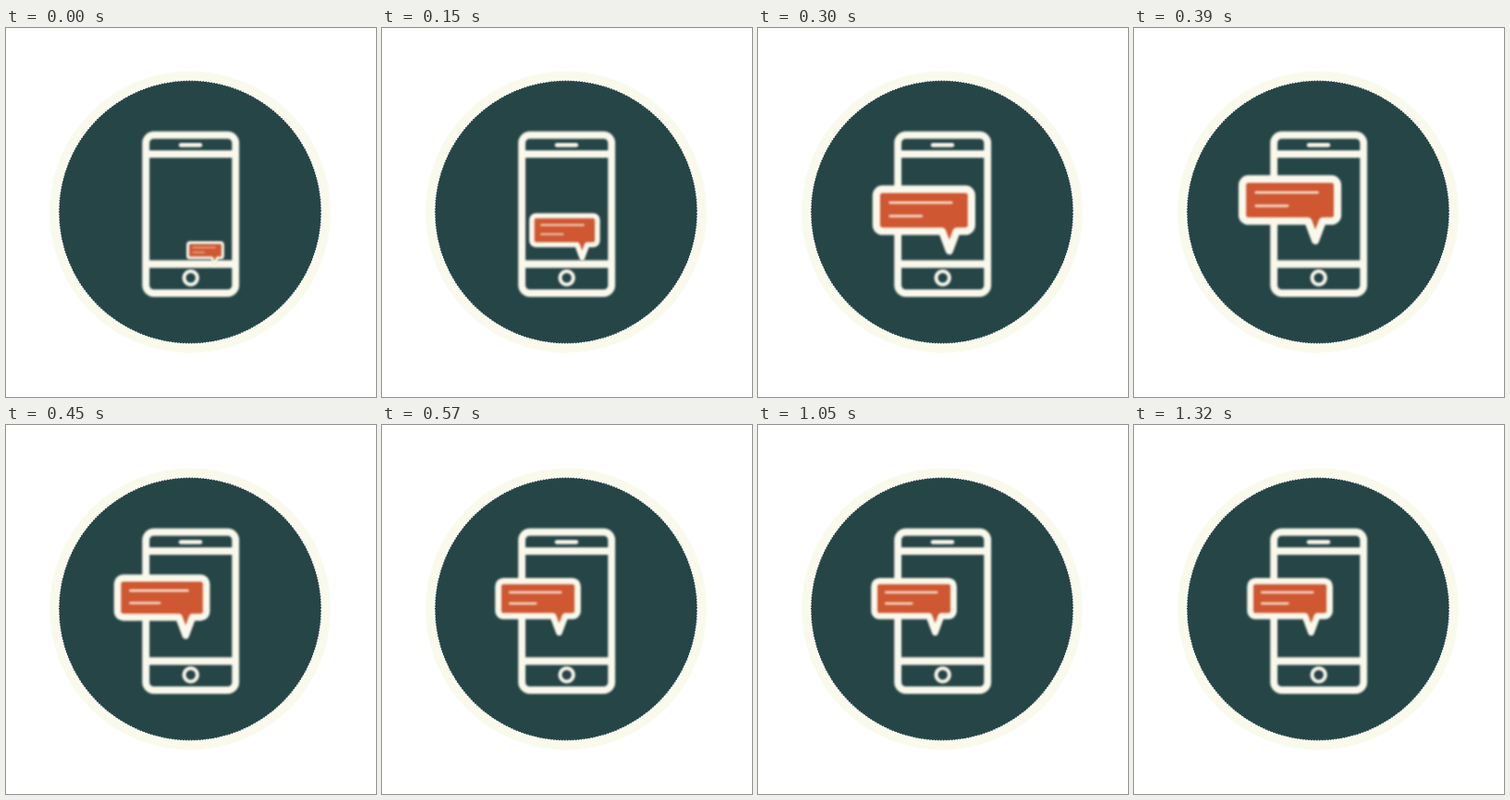
Animation of 400x398 px, one loop 1.35 s. Source, as an HTML page with a canvas:

```html
<!DOCTYPE html>
<html lang="en">
<head>
<meta charset="utf-8">
<title>Phone message</title>
<style>
  html, body { margin: 0; width: 100%; height: 100%; overflow: hidden; background: #fff; }
  canvas { display: block; }
</style>
</head>
<body>
<canvas id="stage" width="400" height="398"></canvas>
<script>
const ctx = document.getElementById('stage').getContext('2d');
const CREAM = '#faf8eb', RING = '#fafaec', TEAL = '#264547', ORANGE = '#cf5732', PALE = '#f5dcc8';
const LOOP = 1350, STEP = 30;
const START = { x: 215.5, y: 243.6 }, REST = { x: 168.7, y: 196 };
const SMALL = 0.44, LARGE = 1.2;

const clamp01 = v => Math.min(1, Math.max(0, v));
const lerp = (a, b, t) => a + (b - a) * t;
const progress = (t, from, to) => clamp01((t - from) / (to - from));

function circle(x, y, radius) {
  ctx.beginPath();
  ctx.arc(x, y, radius, 0, Math.PI * 2);
}

function line(x1, x2, y, width, color, cap = 'round') {
  ctx.strokeStyle = color;
  ctx.lineWidth = width;
  ctx.lineCap = cap;
  ctx.beginPath();
  ctx.moveTo(x1, y);
  ctx.lineTo(x2, y);
  ctx.stroke();
}

function drawBadge() {
  ctx.fillStyle = RING;
  circle(199, 198.5, 152);
  ctx.fill();
  ctx.fillStyle = TEAL;
  circle(199, 198.5, 142);
  ctx.fill();
  // Fine dotted rim between the disc and its ring
  ctx.save();
  ctx.strokeStyle = '#fff';
  ctx.lineWidth = 1.3;
  ctx.lineCap = 'butt';
  ctx.setLineDash([1.5, 1.5]);
  ctx.stroke();
  ctx.restore();
}

function drawPhone() {
  ctx.strokeStyle = CREAM;
  ctx.lineWidth = 7.8;
  ctx.beginPath();
  ctx.roundRect(151.2, 115.5, 97, 170.5, 8.5);
  ctx.stroke();
  line(152, 248, 136, 7.8, CREAM, 'butt');
  line(152, 248, 254.7, 8.2, CREAM, 'butt');
  line(189, 210, 126.2, 4.4, CREAM);
  ctx.lineWidth = 4;
  circle(199.7, 269.5, 7.2);
  ctx.stroke();
}

function bubblePath() {
  const left = 125.7, right = 211.5, top = 168.4, bottom = 206.2, r = 5.5;
  ctx.beginPath();
  ctx.moveTo(left + r, top);
  ctx.arcTo(right, top, right, bottom, r);
  ctx.arcTo(right, bottom, left, bottom, r);
  ctx.lineTo(198, bottom);
  ctx.lineTo(191.5, 223.7);
  ctx.lineTo(185, bottom);
  ctx.arcTo(left, bottom, left, top, r);
  ctx.arcTo(left, top, right, top, r);
  ctx.closePath();
}

function drawBubble(t) {
  const travel = progress(t, 0, 390);
  const scale = t < 390
    ? lerp(SMALL, LARGE, progress(t, 0, 295))
    : lerp(LARGE, 1, progress(t, 390, 540));

  ctx.save();
  ctx.translate(lerp(START.x, REST.x, travel), lerp(START.y, REST.y, travel));
  ctx.scale(scale, scale);
  ctx.translate(-REST.x, -REST.y);
  bubblePath();
  ctx.fillStyle = ORANGE;
  ctx.fill();
  ctx.strokeStyle = CREAM;
  ctx.lineWidth = 6.8;
  ctx.lineJoin = 'round';
  ctx.stroke();
  line(138, 193.5, 180.5, 2.3, PALE);
  line(138, 166.5, 192.5, 2.3, PALE);
  ctx.restore();
}

function render(now) {
  const t = Math.floor((now % LOOP) / STEP) * STEP;
  ctx.fillStyle = '#fff';
  ctx.fillRect(0, 0, 400, 398);
  drawBadge();
  // Soft edges on the icon
  ctx.filter = 'blur(0.9px)';
  drawPhone();
  drawBubble(t);
  ctx.filter = 'none';
}

let start;
function tick(now) {
  start ??= now;
  render(now - start);
  requestAnimationFrame(tick);
}
render(0);
requestAnimationFrame(tick);
</script>
</body>
</html>
```
